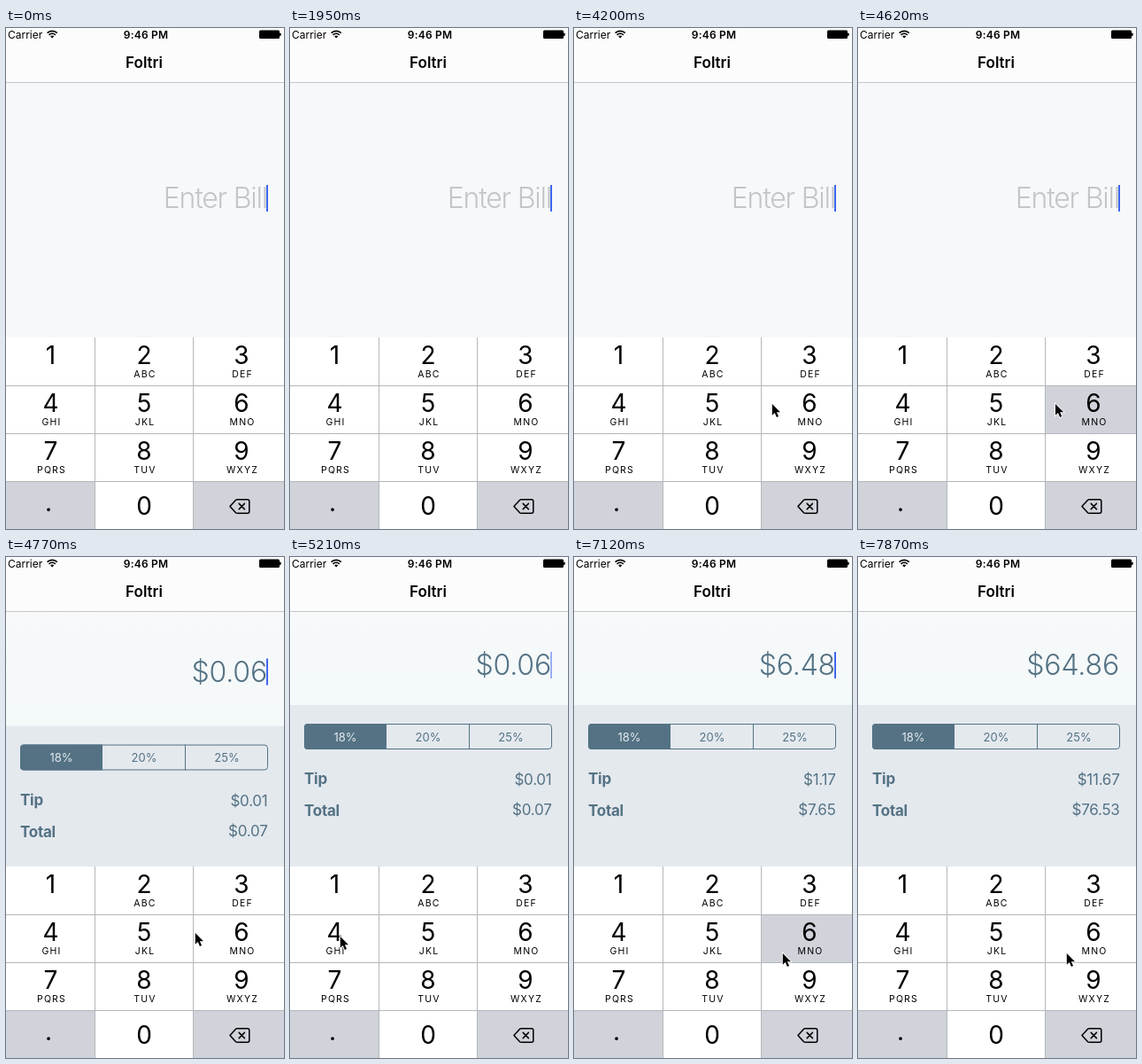
These frames come from a looping animation (314x565 px, 8 s). An HTML page:

```html
<!DOCTYPE html>
<html lang="en">
<head>
<meta charset="utf-8">
<title>Tip calculator</title>
<style>
  html, body { margin: 0; width: 100%; height: 100%; overflow: hidden; background: #f7f8fa; }
  svg { display: block; width: 314px; height: 565px; font-family: Inter, Roboto, sans-serif; }
  .mid { text-anchor: middle; }
  .end { text-anchor: end; }
  .status { font-size: 12px; }
  .title { font-size: 17px; font-weight: 600; }
  .bill { font-size: 32px; font-weight: 300; letter-spacing: -.005em; fill: #547284; }
  .bill.empty { letter-spacing: -.038em; fill: #c3c5c9; }
  .seg { font-size: 13px; fill: #547284; }
  .row { font-size: 17px; fill: #547284; letter-spacing: -.015em; }
  .name { font-weight: 700; }
  .digit { font-size: 28px; }
  .sub { font-size: 10.5px; letter-spacing: 1.2px; }
</style>
</head>
<body>
<svg viewBox="0 0 314 565">
  <defs>
    <linearGradient id="pale" x2="0" y2="1">
      <stop offset="0" stop-color="#f7f9fa"/>
      <stop offset="1" stop-color="#f4f9f9"/>
    </linearGradient>
  </defs>
  <rect width="314" height="565" fill="#f7f8fa"/>
  <rect id="sky" y="62" width="314" height="324" fill="url(#pale)"/>

  <g id="panel">
    <rect width="314" height="400" fill="#e4e9ee"/>
    <rect x="16.5" y="21.5" width="279" height="28" rx="3.5" fill="none" stroke="#547284"/>
    <path d="M109 21H20a4 4 0 0 0-4 4v21a4 4 0 0 0 4 4h89z" fill="#547284"/>
    <path d="M202.5 21v29" stroke="#547284"/>
    <g class="seg mid">
      <text x="62.5" y="40.5" fill="#e4e9ee">18%</text>
      <text x="156" y="40.5">20%</text>
      <text x="249.5" y="40.5">25%</text>
    </g>
    <g class="row">
      <text class="name" x="16" y="89">Tip</text>
      <text class="name" x="16" y="125">Total</text>
      <text class="end" id="tip" x="295.5" y="90"/>
      <text class="end" id="total" x="295.5" y="124"/>
    </g>
  </g>

  <g id="field">
    <text class="bill end" id="bill" x="295" y="26"/>
    <rect id="caret" x="294" width="2" height="30" fill="#4067f0"/>
  </g>

  <rect width="314" height="61" fill="#fcfcfc"/>
  <rect y="61" width="314" height="1" fill="#c4c6c8"/>
  <text class="status" x="2" y="11.5">Carrier</text>
  <path d="M46.6 5.6a8 8 0 0 1 11.2 0M48.6 7.8a5 5 0 0 1 7.2 0" fill="none" stroke="#000" stroke-width="1.7"/>
  <path d="M50.2 9.4a2.8 2.8 0 0 1 4 0l-2 2.1z"/>
  <text class="status mid" x="158" y="11.5" font-weight="600" letter-spacing=".2">9:46 PM</text>
  <rect x="286" y="2.5" width="23" height="9.5" rx="1.5"/>
  <rect x="309" y="5.5" width="1.6" height="3.5" rx=".8"/>
  <text class="title mid" x="156" y="45">Foltri</text>

  <g id="keys"></g>
  <g fill="none" stroke="#000" stroke-width="1.5" stroke-linejoin="round" stroke-linecap="round">
    <path d="M253 539.5l6.6-7.2q.6-.6 1.6-.6h11.6q2 0 2 2v11.6q0 2-2 2h-11.6q-1 0-1.6-.6z"/>
    <path d="M263.2 536.4l6.2 6.2m0-6.2l-6.2 6.2"/>
  </g>
  <g id="mouse">
    <path transform="translate(.8 1) scale(.85)" d="M0 0V15L3.5 11.9 6 17.7 8.5 16.6 6 11H10.8Z"
      stroke="#fff" stroke-width="2" paint-order="stroke"/>
  </g>
</svg>
<script>
const LOOP = 8000, HOLD = 100, SLIDE = 180;
const GREY = '#d0d3da';
const $ = id => document.getElementById(id);

const presses = [
  { key: 6, t: 4550 }, { key: 4, t: 5260 }, { key: 8, t: 6500 }, { key: 6, t: 7120 }
];

// Pointer glides: from time, to time, destination.
const entry = [205, 570];
const glides = [
  [2050, 3300, 129, 426], [3300, 4200, 223, 423], [4600, 4720, 213, 423],
  [4800, 5210, 56, 427], [5950, 6390, 145, 481], [6550, 6970, 235, 446]
];

const clamp = v => Math.min(1, Math.max(0, v));
const smooth = v => v * v * (3 - 2 * v);
const easeOut = v => 1 - (1 - v) ** 2;
const money = v => '$' + v.toFixed(2);
const move = (id, x, y) => $(id).setAttribute('transform', `translate(${x} ${y})`);

function add(tag, attrs, text = '') {
  const el = document.createElementNS('http://www.w3.org/2000/svg', tag);
  for (const k in attrs) el.setAttribute(k, attrs[k]);
  el.textContent = text;
  return $('keys').appendChild(el);
}

// Keypad
const letters = ['', 'ABC', 'DEF', 'GHI', 'JKL', 'MNO', 'PQRS', 'TUV', 'WXYZ'];
const edges = [0, 101, 212, 315], centre = [50.5, 156, 266];
const caps = {};
[...'123456789.0<'].forEach((key, i) => {
  const col = i % 3, y = 349 + 54 * Math.floor(i / 3);
  const fill = '.<'.includes(key) ? GREY : '#fff';
  caps[key] = add('rect', { x: edges[col], y, width: edges[col + 1] - edges[col], height: 54, fill });
  if (key === '<') return;
  const base = i < 9 ? y + 30 : key === '.' ? 545 : 548.5;
  add('text', { class: 'digit mid', x: key === '.' ? 48 : centre[col], y: base }, key);
  if (letters[i]) add('text', { class: 'sub mid', x: centre[col] + 1, y: y + 45 }, letters[i]);
});
for (let y = 403; y < 565; y += 54) add('rect', { y, width: 314, height: 1, fill: '#b4b7ba' });
for (const x of [100, 211]) add('rect', { x, y: 349, width: 1, height: 216, fill: '#b4b7ba' });

function pointer(t) {
  let [x, y] = entry;
  for (const [from, to, nx, ny] of glides) {
    const k = smooth(clamp((t - from) / (to - from)));
    x += (nx - x) * k;
    y += (ny - y) * k;
  }
  return [x, y];
}

// The blink restarts with every key press.
function caretAlpha(t) {
  const last = presses.filter(p => p.t <= t).pop();
  const phase = (t - (last ? last.t : -150)) % 1050;
  if (phase < 600) return 1;
  return phase < 750 || phase > 1000 ? .5 : 0;
}

function draw(t) {
  const typed = presses.filter(p => p.t + HOLD <= t);
  const bill = typed.reduce((cents, p) => cents * 10 + p.key, 0) / 100;
  const tip = Math.round(bill * 18) / 100;
  const slide = easeOut(clamp((t - presses[0].t - HOLD) / SLIDE));

  $('bill').textContent = bill ? money(bill) : 'Enter Bill';
  $('bill').classList.toggle('empty', !bill);
  $('tip').textContent = money(tip);
  $('total').textContent = money(bill + tip);
  $('caret').setAttribute('opacity', caretAlpha(t));
  $('sky').setAttribute('opacity', slide);
  $('sky').setAttribute('height', 324 - 219 * slide);

  move('field', 0, 177 - 70 * slide);
  move('panel', 0, 386 - 219 * slide);
  move('mouse', ...pointer(t));
  for (const { key } of presses) {
    const down = presses.some(p => p.key === key && t >= p.t && t < p.t + HOLD);
    caps[key].setAttribute('fill', down ? GREY : '#fff');
  }
}

const start = performance.now();
function tick() {
  draw((performance.now() - start) % LOOP);
  requestAnimationFrame(tick);
}
tick();
</script>
</body>
</html>
```
